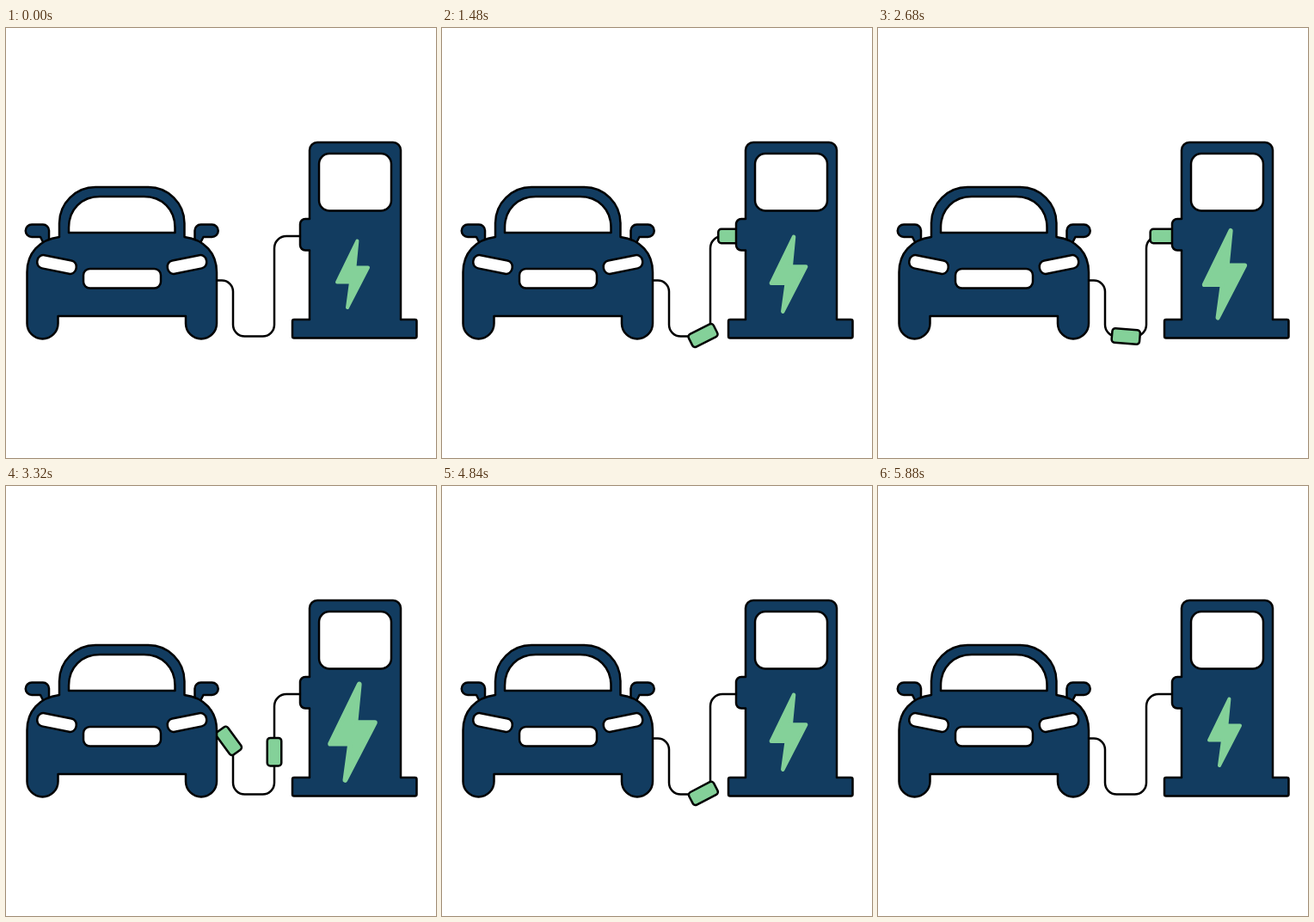
An HTML page that plays this animation: 500 by 500 pixels, repeating every 6040 ms.

```html
<!DOCTYPE html>
<html lang="en">
<head>
<meta charset="utf-8">
<title>Charging car</title>
<style>
  html, body { margin: 0; width: 100%; height: 100%; overflow: hidden; background: #fff; }
  svg { display: block; width: 100%; height: 100%; }
  .line { stroke: #000; stroke-width: 2.5; stroke-linejoin: round; }
  .navy { fill: #123c60; }
  .white { fill: #fff; }
  .green { fill: #84d199; }
</style>
</head>
<body>
<svg viewBox="0 0 500 500">
  <path id="cable" class="line" fill="none" d="M392 242H326a14 14 0 0 0-14 14V345a13.5 13.5 0 0 1-13.5 13.5H277.5a13.5 13.5 0 0 1-13.5-13.5V306.5a13 13 0 0 0-13-13H205"/>
  <g id="pulses"></g>

  <g id="pump" class="line">
    <path class="navy" d="M353 339V258.5H348a6 6 0 0 1-6-6V228a6 6 0 0 1 6-6H353V142a9 9 0 0 1 9-9H450a9 9 0 0 1 9 9V339H475.500a2 2 0 0 1 2 2V358.500a2 2 0 0 1-2 2H335a2 2 0 0 1-2-2V341a2 2 0 0 1 2-2Z"/>
    <rect class="white" x="364" y="146" width="84" height="66.500" rx="12"/>
  </g>
  <path id="bolt" class="green" stroke="#84d199" stroke-width="4" stroke-linejoin="round"
    d="M408.400 247.500L405.400 278.500H421L397 325L401 295.600H385Z"/>

  <g id="car" class="line">
    <g id="mirror">
      <path class="navy" d="M43.500 250L40 243H30a7.200 7.200 0 0 1 0-14.500H43a7 7 0 0 1 7 7V247Z"/>
    </g>
    <use href="#mirror" transform="matrix(-1 0 0 1 269.500 0)"/>
    <path class="navy" d="M62 243V227A42 42 0 0 1 104 185H165.500A42 42 0 0 1 207.500 227V243C231 246 245 262 245 284V343.500a18 18 0 0 1-36 0V335H60.500V343.500a18 18 0 0 1-36 0V284C24.500 262 38.500 246 62 243Z"/>
    <path class="white" d="M73 238V232C73 211 88 196 109 196H160.500C181.500 196 196.500 211 196.500 232V238Z"/>
    <g id="lamp">
      <rect class="white" x="36" y="267.200" width="46" height="15.500" rx="7" transform="rotate(11.500 59 275)"/>
    </g>
    <use href="#lamp" transform="matrix(-1 0 0 1 269.500 0)"/>
    <rect class="white" x="90" y="280" width="90" height="22.500" rx="7.500"/>
  </g>
</svg>
<script>
const LOOP = 6040, STEP = 40;
const SPEED = 0.1283;                     // cable units per ms
const LEAD = 50;                          // cable hidden behind the pump
const STARTS = [365, 1445, 2609, 3728];   // moments each pulse leaves the pump
const BEAT = { start: 265, length: 560, count: 10, grow: 0.45 };
// distance along the cable, heading in degrees (0 = down, 90 = left)
const HEADINGS = [
  [14, 90], [42, 0], [110, 0], [125, 23], [142, 61], [158, 94],
  [175, 128], [190, 155], [210, 175], [226, 172], [241, 143], [262, 95]
];

const cable = document.getElementById("cable");
const bolt = document.getElementById("bolt");
const layer = document.getElementById("pulses");
const cableLength = cable.getTotalLength();

const pulses = STARTS.map(() => {
  const rect = document.createElementNS("http://www.w3.org/2000/svg", "rect");
  const look = { x: -8.25, y: -16.25, width: 16.5, height: 32.5, rx: 3.5, class: "line green" };
  for (const key in look) rect.setAttribute(key, look[key]);
  return layer.appendChild(rect);
});

function heading(s) {
  if (s <= HEADINGS[0][0]) return HEADINGS[0][1];
  for (let i = 1; i < HEADINGS.length; i++) {
    const [s0, a0] = HEADINGS[i - 1], [s1, a1] = HEADINGS[i];
    if (s <= s1) return a0 + (a1 - a0) * (s - s0) / (s1 - s0);
  }
  return 90;
}

function boltScale(t) {
  const beats = (t - BEAT.start) / BEAT.length;
  if (beats < 0 || beats > BEAT.count) return 1;
  const p = 1 - Math.abs(2 * (beats % 1) - 1);
  return 1 + BEAT.grow * p * p * (3 - 2 * p);
}

function draw(t) {
  pulses.forEach((rect, i) => {
    const s = (t - STARTS[i]) * SPEED;
    const shown = s > -LEAD && s + LEAD < cableLength;
    rect.setAttribute("visibility", shown ? "visible" : "hidden");
    if (!shown) return;
    const p = cable.getPointAtLength(s + LEAD);
    rect.setAttribute("transform", `translate(${p.x} ${p.y}) rotate(${heading(s)})`);
  });
  bolt.setAttribute("transform", `translate(403 286.3) scale(${boltScale(t)}) translate(-403 -286.3)`);
}

const begin = performance.now();
function tick() {
  const t = (performance.now() - begin) % LOOP;
  draw(Math.floor(t / STEP) * STEP);
  requestAnimationFrame(tick);
}
tick();
</script>
</body>
</html>
```
